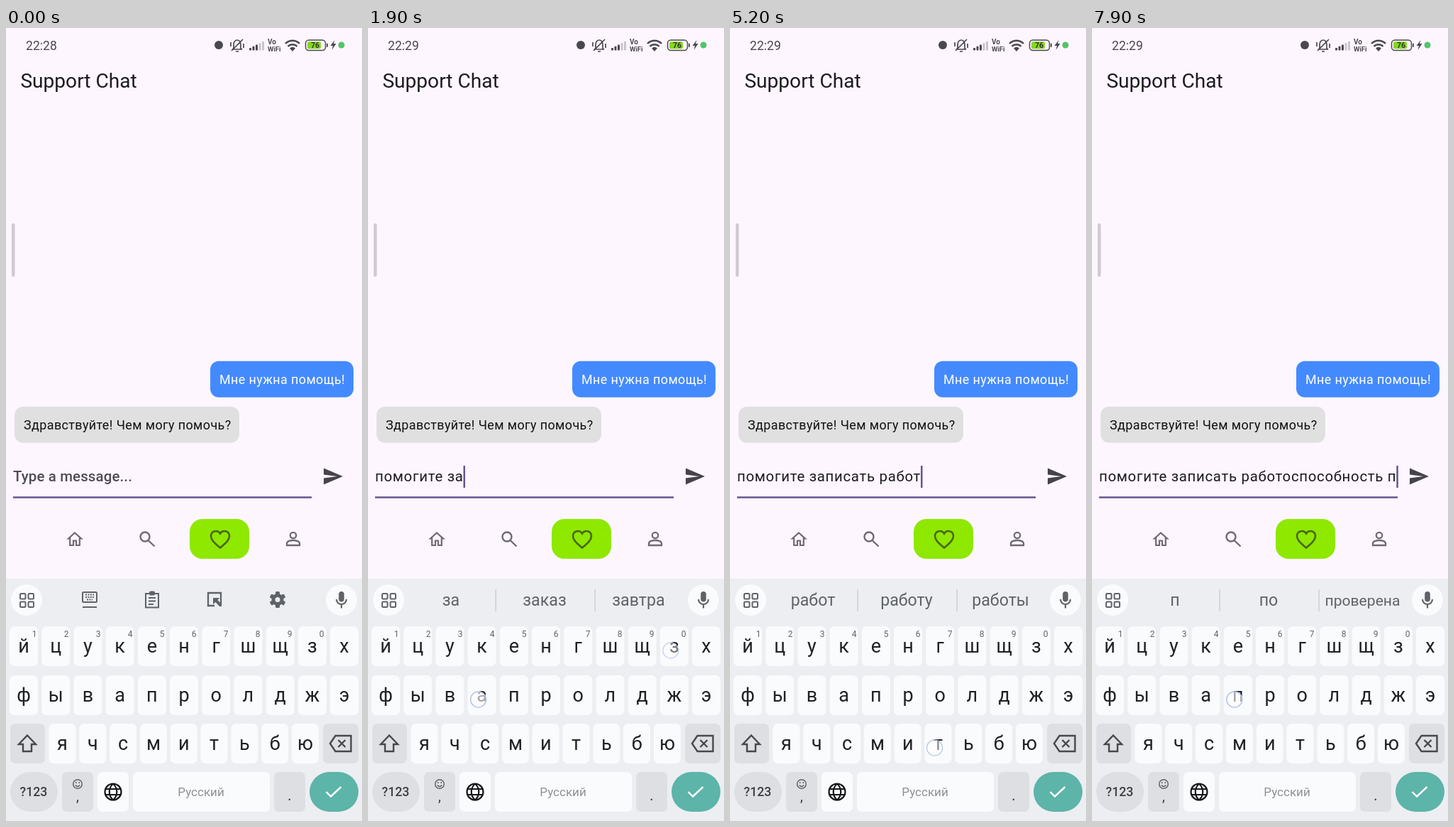
These frames come from a looping animation (502x1116 px, 8000 ms). An HTML page:

```html
<!DOCTYPE html>
<html lang="ru">
<head>
<meta charset="utf-8">
<style>
  html, body { margin: 0; width: 502px; height: 1116px; overflow: hidden; background: #fef6ff; }
  svg { display: block; }
  text { font-family: Roboto, sans-serif; white-space: pre; }
</style>
</head>
<body>
<svg id="stage" width="502" height="1116" viewBox="0 0 502 1116">
  <defs>
    <filter id="soft" x="-30%" y="-30%" width="160%" height="160%">
      <feDropShadow dx="0" dy="1" stdDeviation="2" flood-opacity=".2"/>
    </filter>
  </defs>
  <g id="fixed"></g>
  <g id="tools"></g>
  <g id="suggestions"></g>
  <text id="hint" x="10" y="637.5" font-size="20.4" font-weight="500" letter-spacing=".15" fill="#4f4b55">Type a message...</text>
  <text id="input" x="10" y="637.5" font-size="20.4" letter-spacing=".7" fill="#1d1b20"></text>
  <rect id="caret" y="616" width="2.5" height="31" fill="#66558f"/>
  <g id="touches"></g>
</svg>
<script>
const LOOP = 8000;
const $ = id => document.getElementById(id);
const INK = '#5f6368', KEY = '#fafbfd', DIM = '#dddfe3', BOARD = '#eceef2';

const rect = (x, y, w, h, r, fill, more = '') =>
  `<rect x="${x}" y="${y}" width="${w}" height="${h}" rx="${r}" fill="${fill}" ${more}/>`;
const circle = (x, y, r, fill, more = '') =>
  `<circle cx="${x}" cy="${y}" r="${r}" fill="${fill}" ${more}/>`;
const label = (x, y, size, fill, str, more = '') =>
  `<text x="${x}" y="${y}" font-size="${size}" fill="${fill}" ${more}>${str}</text>`;
const mid = 'text-anchor="middle"';
const line = (x, y, d, color = INK, width = 2, more = '') =>
  `<path transform="translate(${x} ${y})" d="${d}" fill="none" stroke="${color}" stroke-width="${width}" ${more}/>`;
const solid = (x, y, d, color = INK) =>
  `<path transform="translate(${x} ${y})" d="${d}" fill="${color}"/>`;

// Key centres by letter
const keys = { _: [275, 1075] };
const rows = [['йцукенгшщзх', 25, 45.2, 870, 40], ['фывапролджэ', 25, 45.2, 939, 40], ['ячсмитьбю', 79.5, 42.8, 1007, 38]];
for (const [letters, x, step, y] of rows)
  [...letters].forEach((c, i) => keys[c] = [x + i * step, y]);

function statusBar() {
  const c = '#4a474e';
  let s = `<text id="clock" x="28" y="31" font-size="17.6" fill="${c}"></text>`;
  s += circle(300, 24, 6, c);
  s += line(326, 24, 'M-5 5V-1A5 6 0 0 1 5-1V5L7 6H-7ZM-2 9H2M-8 8L8-8M-9-4V2M9-2V4', c, 1.7);
  for (let i = 0; i < 5; i++)
    s += rect(343 + i * 4.5, 28 - i * 2.3, 3, 3.5 + i * 2.3, .8, i < 3 ? c : '#c9c3cb');
  s += label(369, 23, 10, c, 'Vo', 'font-weight="700"') + label(369, 33, 9.5, c, 'WiFi', 'font-weight="700"');
  s += line(404, 24, 'M-10-2A14 14 0 0 1 10-2M-6.5 2A9 9 0 0 1 6.5 2', c, 2.4) + solid(404, 24, 'M-4 4.5Q0 1 4 4.5L0 9Z', c);
  s += rect(422.5, 17, 28, 14.5, 4.5, '#fef6ff', `stroke="${c}" stroke-width="1.5"`);
  s += rect(425, 19.3, 19, 10, 2, '#84d91b') + rect(452, 21.5, 1.8, 5.5, 1, c);
  s += label(436, 28.3, 10.5, '#333', '76', mid + ' font-weight="700"');
  return s + solid(461.5, 24, 'M2-7L-4 1H-.5L-2 7 4-2H.5Z', c) + circle(473, 24, 4.5, '#51c56a');
}

function chat() {
  const c = '#6e6972';
  return label(20.4, 83.5, 28.1, '#1d1b20', 'Support Chat')
    + rect(8, 275, 4.5, 75, 2, '#d2cad3')
    + rect(288, 468.7, 202, 51, 12, '#448aff')
    + label(301, 501, 17.9, '#fff', 'Мне нужна помощь!', 'letter-spacing=".42"')
    + rect(12, 532.7, 317, 51, 12, '#e0e0e0')
    + label(25, 565, 17.9, '#111', 'Здравствуйте! Чем могу помочь?', 'letter-spacing=".42"')
    + rect(10, 659.3, 421, 2.5, 0, '#66558f')
    + solid(448, 631, 'M0-11.5L27 0 0 11.5V2.6L19 0 0-2.6Z', '#47434b')
    + line(97, 719, 'M-9-.5L0-8.5 9-.5H6.8V9H2V2.5H-2V9H-6.8V-.5Z', c, 2.2)
    + line(199, 719, 'M3.5-3A6.5 6.5 0 1 1-9.5-3 6.5 6.5 0 0 1 3.5-3M1.5 2L10.5 10.5', c, 2.4)
    + rect(259, 691, 84, 56, 18, '#8ee800')
    + line(302, 720, 'M0 11.5C-9 4-13 0-13-5A7 7 0 0 1 0-8.5 7 7 0 0 1 13-5C13 0 9 4 0 11.5Z', '#4c6718', 2.6)
    + circle(405, 714, 4.2, 'none', `stroke="${c}" stroke-width="2.3"`)
    + line(405, 719, 'M-9 9V6.5C-9 3-3 2 0 2S9 3 9 6.5V9Z', c, 2.3);
}

function keyboard() {
  let s = rect(0, 775, 502, 341, 0, BOARD);
  s += circle(29, 805, 22, KEY) + circle(473, 805, 22, KEY);
  for (const x of [20, 31.5]) for (const y of [796, 807.5])
    s += rect(x, y, 7.5, 7.5, 1.5, 'none', `stroke="${INK}" stroke-width="2"`);
  s += rect(469.2, 793, 7.6, 14.5, 3.8, INK) + line(473, 805, 'M-7-1A7 7 0 0 0 7-1M0 6V11.5', INK, 2.2);

  for (const [letters, , , , width] of rows) for (const c of letters) {
    const [x, y] = keys[c];
    s += rect(x - width / 2, y - 28, width, 56, 7, KEY) + label(x, y + 9, 27, '#202124', c, mid);
  }
  [...'1234567890'].forEach((n, i) => s += label(40 + i * 45, 857, 12, INK, n, mid));

  s += rect(6, 979, 49, 56, 7, DIM) + line(30, 1007, 'M0-11.5L12 1H6V11H-6V1H-12Z', '#45484c', 2.4);
  s += rect(447, 979, 50, 56, 7, DIM);
  s += line(472, 1007, 'M-15 0L-7.5-11H14.5V11H-7.5ZM-3.5-5L6.5 5M6.5-5L-3.5 5', '#45484c', 2.4);
  s += rect(6, 1047, 67, 56, 28, DIM) + label(39, 1081, 17.7, '#3c4043', '?123', mid + ' font-weight="500"');
  s += rect(79, 1047, 44, 56, 7, DIM) + circle(101, 1064, 6.3, 'none', `stroke="${INK}" stroke-width="1.5"`);
  s += line(101, 1064, 'M-3.2 1.5Q0 5.5 3.2 1.5M-2.3-3V-1M2.3-3V-1', INK, 1.5) + label(101, 1088, 20, '#3c4043', ',', mid);
  s += rect(129, 1047, 44, 56, 7, KEY);
  s += line(151, 1075, 'M-11.5 0A11.5 11.5 0 1 0 11.5 0 11.5 11.5 0 1 0-11.5 0M0-11.5C-7-5-7 5 0 11.5 7 5 7-5 0-11.5M-10.5-4H10.5M-10.5 4H10.5', '#17181a', 2.2);
  s += rect(179, 1047, 193, 56, 7, KEY) + label(275, 1081, 17, '#8d9095', 'Русский', mid);
  s += rect(378, 1047, 44, 56, 7, DIM) + label(400, 1087, 22, '#3c4043', '.', mid);
  return s + rect(428, 1047, 69, 56, 28, '#5db4a9') + line(462, 1075, 'M-10.5 0L-4 6.5 10.5-7', '#fff', 2.4);
}

function toolIcons() {
  let s = rect(108, 794, 20, 14, 1.5, 'none', `stroke="${INK}" stroke-width="2"`);
  s += line(118, 801, 'M-6-3.5H6M-6 0H6M-4 3.5H4', INK, 2, 'stroke-dasharray="2 1.4"') + line(118, 815, 'M-10 0H10');
  s += line(206, 805, 'M-9-9H9V10.5H-9ZM-5-3H5M-5 1.5H5M-5 6H2') + rect(202, 792.5, 8, 6, 2, INK);
  s += line(294, 804, 'M9 9V-9H-9V9H0', INK, 2.3) + solid(294, 804, 'M-2-2H7L4.5 1 10 7V10H7L1.5 4-2 7Z');
  for (let a = 0; a < 180; a += 60)
    s += rect(380, 793, 6, 23, 1.5, INK, `transform="rotate(${a} 383 804.5)"`);
  return s + circle(383, 804.5, 6, BOARD, `stroke="${INK}" stroke-width="5"`);
}

// Commit time, key, then the suggestions that follow it; "+" takes the middle suggestion
const presses = `250 п по привет
400 о под пока
540 м помощь помоги
680 о помощь помоги
820 г помогите помоги
970 и помогите помощь
1120 т помогите помоги
1400 е помогите помогать
1600 _ мне с найти
1760 з за здесь
1900 а заказ завтра
2040 п запись записать
2180 и запись записать
2330 с запись записать
2460 а записать записаться
2560 т записать записаться
2800 ь записаться записал
3300 _ в на под
4480 р работу раз
4640 а работу раз
4780 б работу работы
4930 о работу работы
5080 т работу работы
5900 о работоспособен работой
6080 с работо...бность работ...ности
6260 п работо...бность работ...ности
6440 о работо...бность работ...ности
6800 + и в на
7860 п по проверена`.split('\n').map(row => {
  const [at, key, ...next] = row.split(' ');
  return { at: +at, key, next };
});
let typed = '';
for (const p of presses) {
  typed = p.key === '+' ? typed.replace(/\S+$/, 'работоспособность ') : typed + p.key.replace('_', ' ');
  p.text = typed;
  const word = typed.split(' ').pop();
  p.words = word ? [word, ...p.next] : p.next;
  p.spot = keys[p.key] || [223, 814];
}

$('fixed').innerHTML = statusBar() + chat() + keyboard();
$('tools').innerHTML = toolIcons();

const show = (id, on) => $(id).style.display = on ? '' : 'none';

function showState(last) {
  show('tools', !last);
  show('hint', !last);
  show('suggestions', last);
  $('input').textContent = last ? last.text : '';
  if (!last) return;
  $('caret').setAttribute('x', 10 + $('input').getComputedTextLength());
  const box = $('suggestions');
  box.innerHTML = rect(180, 782, 140, 46, 8, '#d9dce0', 'id="chosen"')
    + rect(179.5, 790, 1.2, 31, 0, '#c4c7cc') + rect(319.5, 790, 1.2, 31, 0, '#c4c7cc')
    + last.words.map((w, i) => label([117, 249, 381.5][i], 813, 23.2, INK, w, mid)).join('');
  // Long words shrink to their cell
  box.querySelectorAll('text').forEach((el, i) => {
    const room = i === 1 ? 120 : 106, width = el.getComputedTextLength();
    if (width > room) el.setAttribute('font-size', 23.2 * room / width);
  });
}

function touch({ key, spot: [x, y] }, age) {
  let s = '';
  if (age < 0 && /[а-я]/.test(key)) {
    s += rect(x - 20, y - 28, 40, 56, 7, BOARD, 'opacity=".75"');
    s += circle(x, y - 67, 34, '#cdcfd3', 'filter="url(#soft)" opacity=".93"');
    s += label(x, y - 57, 31, '#36383c', key, mid);
  }
  const fade = Math.min(1, (220 - age) / 120);
  return s + circle(x - 5, y + 6, 11, 'rgba(255,255,255,.6)', `stroke="#b4c3e4" stroke-width="1.5" opacity="${fade}"`);
}

let shown;
function draw(t) {
  const last = presses.filter(p => p.at <= t).pop();
  if (last !== shown) showState(shown = last);
  $('clock').textContent = t < 600 ? '22:28' : '22:29';
  show('caret', last && (t - last.at) % 1000 < 500);
  const active = presses.filter(p => t > p.at - 110 && t < p.at + 220);
  $('touches').innerHTML = active.map(p => touch(p, t - p.at)).join('');
  if (last) show('chosen', active.some(p => p.key === '+' && t < p.at));
}

const start = performance.now();
function tick() {
  draw((performance.now() - start) % LOOP);
  requestAnimationFrame(tick);
}
showState();
tick();
</script>
</body>
</html>
```
